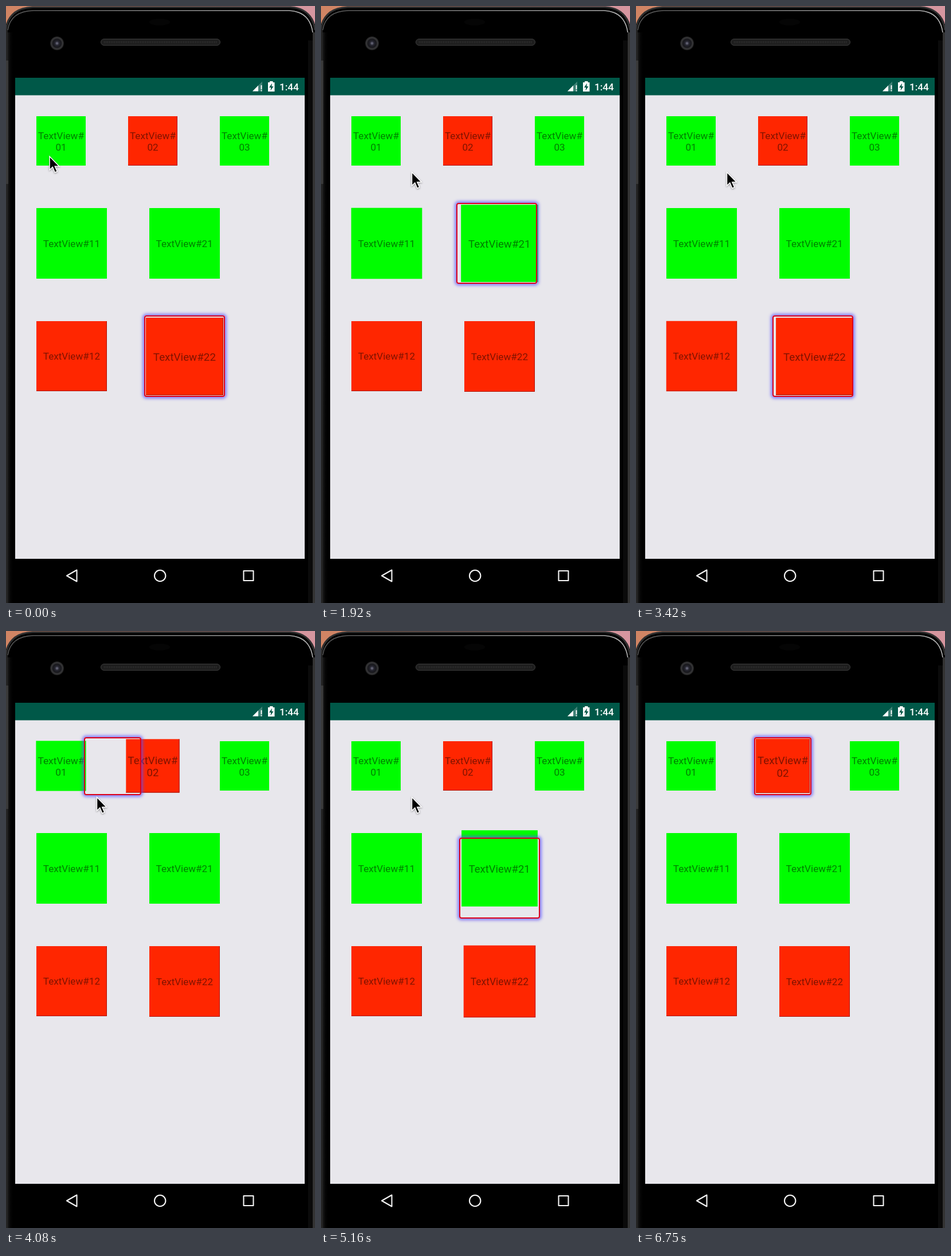
Animation of 539 by 1040 pixels, one loop 6810 ms. Source, as an HTML page:

```html
<!DOCTYPE html>
<html lang="en">
<head>
<meta charset="utf-8">
<style>
  html, body { margin: 0; width: 100%; height: 100%; overflow: hidden; background: #000; }
  #stage { position: relative; width: 539px; height: 1040px; overflow: hidden; }
  svg { position: absolute; left: 0; top: 0; }
  .tile {
    position: absolute; display: flex; align-items: center; justify-content: center;
    text-align: center; white-space: pre; color: rgba(0, 0, 0, .5);
    font: 17.1px/20px Roboto, sans-serif; padding-top: 1px; box-sizing: border-box;
  }
  .green { background: #00fd00; }
  .red { background: #ff2600; box-shadow: inset -1px -1px 0 rgba(110, 0, 0, .55); }
  #ring {
    position: absolute; box-sizing: border-box; border: 2px solid #dc0018; border-radius: 4px;
    box-shadow: 0 0 5px 3px rgba(85, 75, 255, .65);
  }
</style>
</head>
<body>
<div id="stage">
  <svg width="539" height="1040">
    <defs>
      <linearGradient id="wall"><stop stop-color="#d08463"/><stop offset="1" stop-color="#d696a0"/></linearGradient>
      <linearGradient id="rim"><stop stop-color="#555"/><stop offset=".5" stop-color="#8a8a8a"/><stop offset="1" stop-color="#b5b5b5"/></linearGradient>
      <linearGradient id="side"><stop stop-color="#343434"/><stop offset=".5" stop-color="#0c0c0c"/><stop offset="1" stop-color="#000"/></linearGradient>
      <radialGradient id="lens"><stop stop-color="#77778c"/><stop offset=".3" stop-color="#25252f"/><stop offset=".6" stop-color="#17171b"/><stop offset=".8" stop-color="#38383a"/><stop offset="1" stop-color="#1c1c1c"/></radialGradient>
    </defs>
    <rect width="539" height="60" fill="url(#wall)"/>
    <path d="M-2 1042V42Q2 4 46 2H496Q536 4 541 42V1042Z" fill="#000"/>
    <path d="M0 42Q4 4 46 2H496Q534 4 539 42" fill="none" stroke="#303030" stroke-width="3"/>
    <path d="M3 42Q8 9 48 8H494Q530 10 535 46" fill="none" stroke="url(#rim)" stroke-width="1.6"/>
    <path d="M0 42H3V1040H0Z" fill="#242424"/>
    <path d="M0 95H4V310H0Z" fill="#3a3a3a"/>
    <path d="M3 46H12V1040H3Z" fill="url(#side)" opacity=".5"/>
    <path d="M527 1040V60H535V1040Z" fill="#0b0b0b"/>
    <path d="M535 46H539V1040H535Z" fill="#333"/>
    <ellipse cx="268" cy="28" rx="18" ry="6" fill="#050505"/>
    <circle cx="89" cy="65" r="12" fill="url(#lens)"/>
    <rect x="165.5" y="57.5" width="208" height="11" rx="5.5" fill="#1e1e1e" stroke="#3d3d3d"/>
    <path d="M171 63H368" stroke="#303030" stroke-width="4" stroke-dasharray="1 2"/>

    <rect x="16" y="125" width="505" height="838" fill="#e8e7ec"/>
    <rect x="16" y="125" width="505" height="30.5" fill="#005848"/>
    <path d="M430 148.500L447 131.500V148.500Z" fill="#fff" opacity=".25"/>
    <path d="M430 148.500L440 138.500V148.500Z" fill="#fff"/>
    <path d="M445.500 138V145M445.500 146.500V148.500" stroke="#fff" stroke-width="1.8"/>
    <path d="M457 133H460V131H465.500V133H468.500V149H457Z" fill="#fff"/>
    <path d="M464 134.500L459 142H462.200L461.500 147.500L466.500 140H463.300Z" fill="#005848"/>
    <text x="477" y="146.500" font-family="Roboto, sans-serif" font-weight="500" font-size="17.2" fill="#fff">1:44</text>
    <g fill="none" stroke="#f4f4f4" stroke-width="2.1" stroke-linejoin="round">
      <path d="M106 992.500L123.500 982.500V1002.500Z"/>
      <circle cx="268.700" cy="992.500" r="9.700"/>
      <rect x="414.500" y="984" width="17" height="17"/>
    </g>
  </svg>
  <div id="tiles"></div>
  <div id="ring"></div>
  <svg width="539" height="1040">
    <path id="mouse" d="M0 0V23.500L5.300 18.500L9.300 28L13.300 26.300L9.300 17.200H16.800Z" fill="#000" stroke="#fff" stroke-width="1.500" style="filter:drop-shadow(0 1px 1.500px rgba(0,0,0,.4))"/>
  </svg>
</div>
<script>
const LOOP = 6810, MOVE = 200, GROW = 0.1, PAD = 3;
const $ = id => document.getElementById(id);

const tiles = {};
function addTile(id, x, y, size, color, label) {
  const el = document.createElement('div');
  el.className = 'tile ' + color;
  el.textContent = label;
  el.style.cssText = `left:${x}px;top:${y}px;width:${size}px;height:${size}px`;
  $('tiles').append(el);
  tiles[id] = { el, cx: x + size / 2, cy: y + size / 2, half: size * (1 + GROW) / 2 + PAD };
}
['green', 'red', 'green'].forEach((color, i) =>
  addTile('0' + (i + 1), 53 + 160 * i, 192.4, 86, color, 'TextView#\n0' + (i + 1)));
['green', 'red'].forEach((color, row) => [1, 2].forEach(col => {
  const id = `${col}${row + 1}`;
  addTile(id, 53 + 196.8 * (col - 1), 351.8 + 196.8 * row, 122.8, color, 'TextView#' + id);
}));

// Focus order: start time and the tile that receives the ring
const moves = [
  [-MOVE, '22'], [600, '01'], [1500, '11'], [1750, '21'], [1990, '02'], [2235, '03'],
  [2480, '21'], [2720, '11'], [2980, '12'], [3245, '22'], [3505, '21'], [3770, '02'],
  [4030, '01'], [4310, '11'], [4588, '12'], [4805, '22'], [5020, '21'], [5235, '02'],
  [5450, '03'], [5950, '02']
];

const clamp = v => Math.min(1, Math.max(0, v));
const mix = (a, b, k) => a + (b - a) * k;
const decelerate = p => 1 - (1 - p) ** 2;
const smooth = p => (1 - Math.cos(Math.PI * p)) / 2;

function drawFocus(t) {
  let i = moves.length - 1;
  while (moves[i][0] > t) i--;
  const to = moves[i][1], from = moves[Math.max(0, i - 1)][1];
  const p = clamp((t - moves[i][0]) / MOVE), k = decelerate(p), s = smooth(p);
  for (const id in tiles) {
    const focus = id === to ? (from === to ? 1 : s) : id === from ? 1 - s : 0;
    tiles[id].el.style.transform = `scale(${1 + GROW * focus})`;
  }
  const a = tiles[from], b = tiles[to], half = mix(a.half, b.half, k);
  const style = $('ring').style;
  style.left = mix(a.cx, b.cx, k) - half + 'px';
  style.top = mix(a.cy, b.cy, k) - half + 'px';
  style.width = style.height = 2 * half + 'px';
}

function drawMouse(t) {
  const away = smooth(clamp((t - 900) / 400)), exit = smooth(clamp((t - 6120) / 480));
  const x = mix(mix(76, 158.5, away), 130, exit);
  const y = mix(mix(262, 289.5, away), 1050, exit);
  $('mouse').setAttribute('transform', `translate(${x} ${y})`);
}

function draw() {
  const now = performance.now() % LOOP;
  const shift = now < 5670 ? 0 : 30;
  const t = Math.floor((now - shift) / 60) * 60 + shift;
  drawFocus(t);
  drawMouse(t);
  requestAnimationFrame(draw);
}
draw();
</script>
</body>
</html>
```
